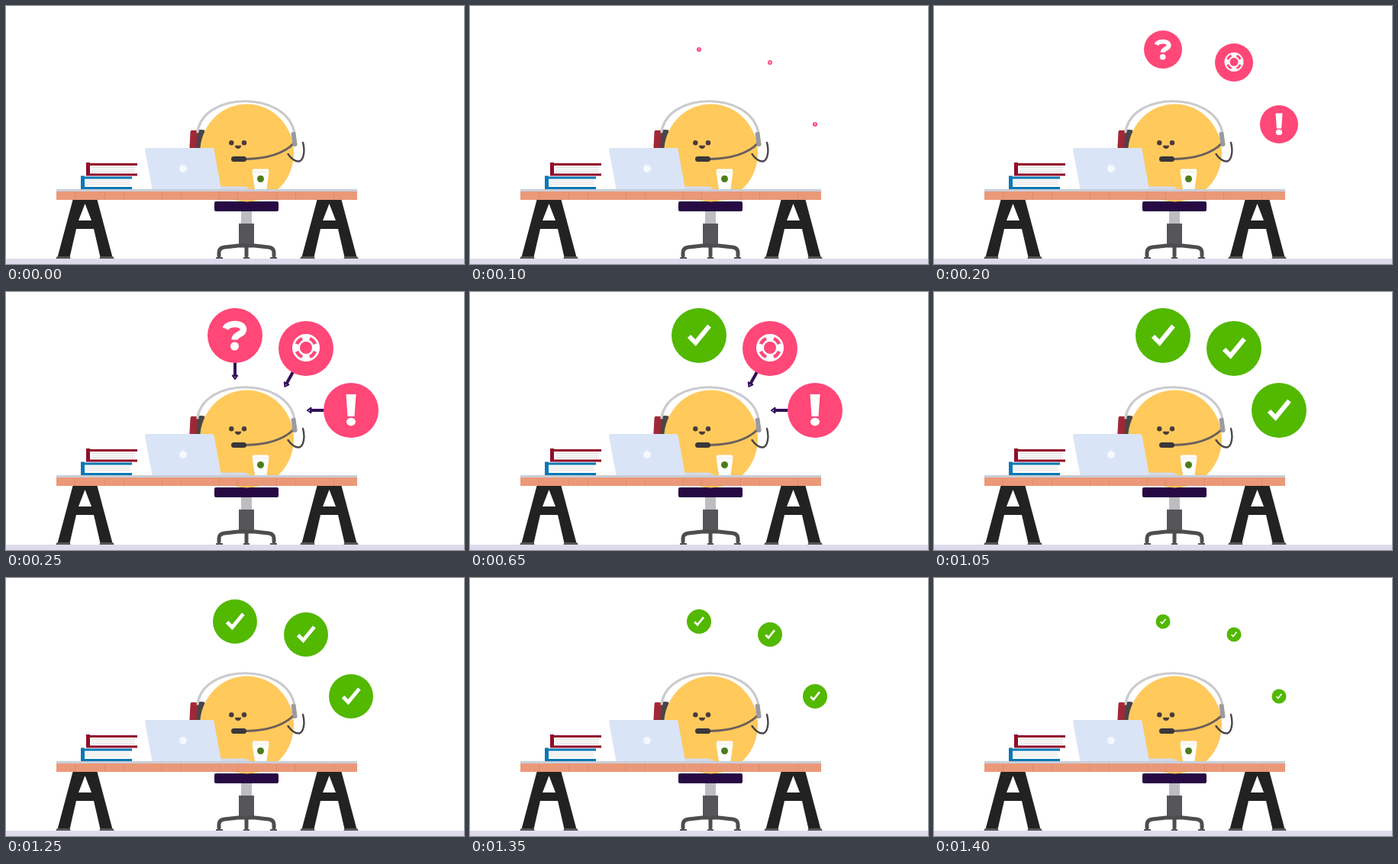
These frames come from a looping animation (600 px wide and 338 px high, 1.45 s). An HTML page:

```html
<!DOCTYPE html>
<html lang="en">
<head>
<meta charset="utf-8">
<title>Support desk</title>
<style>
html, body { margin: 0; width: 100%; height: 100%; overflow: hidden; background: #fff; }
svg { display: block; width: 100vw; height: 100vh; }
.line { fill: none; stroke-linecap: round; stroke-linejoin: round; }
</style>
</head>
<body>
<svg viewBox="0 0 600 338">
  <defs>
    <g id="trestle">
      <path fill="#222" d="M-16 254H16L36 329H20L11.5 292H-11.5L-20 329H-36ZM0 259L-8.5 281H8.5Z" fill-rule="evenodd"/>
      <path fill="#555" d="M-38 331q0-3 3-3h13q3 0 3 3zM19 331q0-3 3-3h13q3 0 3 3z"/>
    </g>
    <g id="book">
      <path fill="#fff" d="M4 3H64V15H4Z"/>
      <path stroke="#dedede" d="M7 6.5H64M7 9H64M7 11.5H64"/>
      <path fill="currentColor" d="M0 0H5V1H67V4H5V14.5H67V17.5H0Z"/>
    </g>
    <g id="question">
      <path fill="none" stroke="#fff" stroke-width="8.5" d="M-12.5 -9C-9 -17 11 -17.5 11 -7.5C11 -1 -.5 -2 -.5 5.5"/>
      <circle cx="-.5" cy="14" r="5.5" fill="#fff"/>
    </g>
    <g id="buoy" fill="none" transform="translate(0 -1)">
      <circle r="13" stroke="#fff" stroke-width="10"/>
      <circle r="13" stroke="#ff4778" stroke-width="4.5" pathLength="8" stroke-dasharray="1 1" stroke-dashoffset="-.5"/>
    </g>
    <g id="alert" fill="#fff">
      <path d="M-6.5 -21H6.5L4.5 8H-4.5Z"/>
      <ellipse cy="15" rx="6" ry="5.3"/>
    </g>
    <path id="check" fill="none" stroke="#fff" stroke-width="6" d="M-13 1L-4.5 9.5L13.5 -12.5"/>
    <g id="arrow" class="line" stroke="#321058" fill="#321058">
      <path stroke-width="4" stroke-linecap="butt" d="M34 0H54"/>
      <path stroke-width="2" d="M57 0L52.5 -3.2V3.2Z"/>
    </g>
  </defs>

  <path fill="#dddbeb" d="M0 331H600V338H0Z"/>

  <!-- chair -->
  <path fill="#bdbdc1" d="M308 269H322V286H308Z"/>
  <path fill="#565557" d="M305 285H325V314H305Z"/>
  <path class="line" stroke="#4d4c4f" stroke-width="5" d="M279 327V323Q279 317 286 316L304 314H326L344 316Q351 317 351 323V327M315 314V327"/>
  <path fill="#565557" d="M275 331v-2h9v2zM311 331v-2h8v2zM346 331v-2h9v2z"/>
  <rect x="273" y="256" width="84" height="13" rx="2" fill="#270943"/>

  <!-- agent and headset -->
  <rect x="241" y="163" width="14" height="25" rx="2.5" fill="#a02836" transform="rotate(3 247 175)"/>
  <rect x="250" y="162" width="10" height="26" rx="2" fill="#4a4548" transform="rotate(3 254 175)"/>
  <ellipse cx="315.5" cy="192.5" rx="61.5" ry="64" fill="#ffc95c"/>
  <path class="line" stroke="#cbcacf" stroke-width="3.2" d="M251 165C258 112 368 110 378 167"/>
  <path class="line" stroke="#69605c" stroke-width="3" d="M377 180C363 194 341 200 314 200.5"/>
  <rect x="374.5" y="165" width="6" height="19" rx="2" fill="#9b9a9f" transform="rotate(-8 377 174)"/>
  <rect x="295" y="197" width="20" height="7" rx="3.5" fill="#3a3639"/>
  <path class="line" stroke="#4a4649" stroke-width="2.4" d="M389 179C392 190 390 202 384 203.5C378 204 373 199 369.5 194"/>
  <g fill="#493b38">
    <circle cx="295.3" cy="179.3" r="3.2"/>
    <circle cx="312" cy="179.3" r="3.2"/>
    <path d="M299.7 182.8H308.3Q307.5 187 304 187T299.7 182.8Z"/>
  </g>

  <!-- desk and items -->
  <use href="#trestle" x="103.5"/>
  <use href="#trestle" x="423.5"/>
  <path fill="#eb9878" d="M66 242H460V254H66Z"/>
  <path stroke="#dd8b6c" d="M90.5 244V254M129.500 244V254M154.500 244V254M204.500 244V254M229.500 244V254M279.500 244V254M303.500 244V254M354.500 244V254M379.500 244V254M429.500 244V254"/>
  <path fill="#c9cdd7" d="M66 240H460V243H66Z"/>
  <use href="#book" x="105" y="205" color="#920b2b"/>
  <use href="#book" x="98" y="222.500" color="#0878b4"/>
  <path fill="#d2daea" d="M280 240V236.500H312Q317 237 319 240Z"/>
  <path fill="#dae4f7" d="M184 186H270Q272 186 272.500 188L282 240H191.500L182 188.500Q181.700 186 184 186Z"/>
  <circle cx="232" cy="213" r="5" fill="#f4f8ff"/>
  <path fill="#fff" d="M322.500 217L323.500 213.500H343.500L344.500 217L341.500 240H326Z"/>
  <path stroke="#eceaea" d="M323 217.500H344"/>
  <circle cx="333.500" cy="226.500" r="4.500" fill="#4b7d1d"/>

  <g id="bubbles"></g>
</svg>
<script>
const LOOP = 1450, STEP = 50, RADIUS = 36;
const bubbles = [
  { x: 300, y: 57, icon: 'question', angle: 90, solved: 650 },
  { x: 393, y: 74, icon: 'buoy', angle: 119, solved: 850 },
  { x: 452, y: 155, icon: 'alert', angle: 180, solved: 1050 }
];
const layer = document.getElementById('bubbles');

layer.innerHTML = bubbles.map(b => `<g>
  <use href="#arrow" transform="rotate(${b.angle})"/>
  <circle r="${RADIUS}"/><use/></g>`).join('');

function radiusAt(t) {
  if (t < 100) return 0;
  if (t < 250) return RADIUS - 11 * (250 - t) / STEP;
  if (t < 1250) return RADIUS;
  return 29 - 6.5 * (t - 1250) / STEP;
}

function draw(now) {
  const t = Math.floor(now % LOOP / STEP) * STEP;
  const scale = radiusAt(t) / RADIUS;
  bubbles.forEach((b, i) => {
    const group = layer.children[i];
    const [arrow, disc, icon] = group.children;
    const solved = t >= b.solved;
    group.setAttribute('transform', `translate(${b.x} ${b.y}) scale(${scale})`);
    group.style.display = scale ? '' : 'none';
    arrow.style.display = t >= 250 && !solved ? '' : 'none';
    disc.setAttribute('fill', solved ? '#52b800' : '#ff4778');
    icon.setAttribute('href', solved ? '#check' : '#' + b.icon);
  });
}

const start = performance.now();
function tick() {
  draw(performance.now() - start);
  requestAnimationFrame(tick);
}
tick();
</script>
</body>
</html>
```
